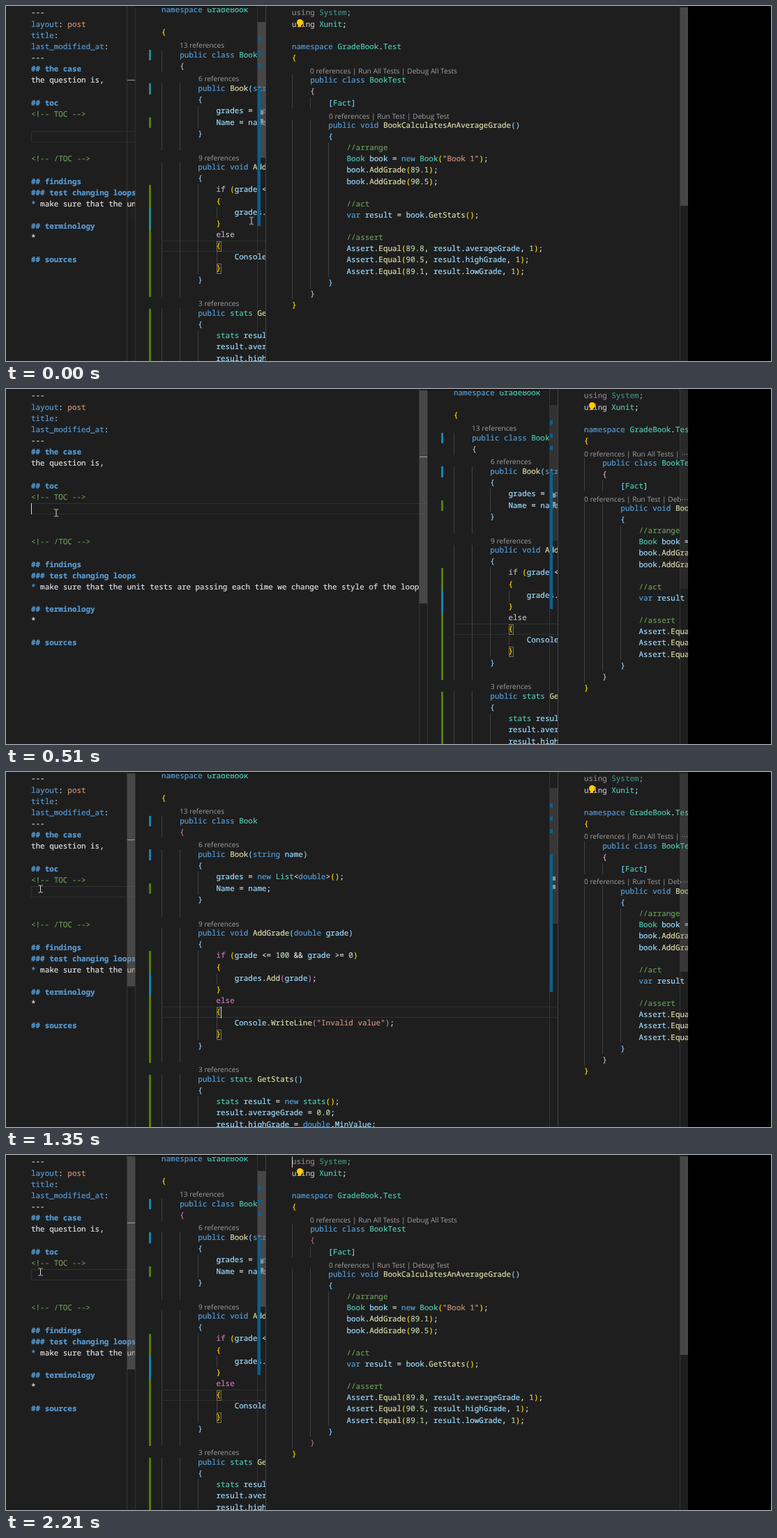
Animation, 1097 px wide and 510 px high, one loop 2.55 s. Source, as an HTML page:

```html
<!DOCTYPE html>
<html lang="en">
<head>
<meta charset="utf-8">
<title>Editor panes</title>
<style>
  html, body { margin: 0; width: 100%; height: 100%; overflow: hidden; background: #000; }
  #stage { position: relative; width: 1097px; height: 510px; overflow: hidden; background: #000; }
  #stage div, #stage svg { position: absolute; }

  .pane { top: 0; height: 510px; overflow: hidden; background: #1e1e1e; }
  #book { box-shadow: inset 1px 0 #303030; }
  #test { box-shadow: inset 1px 0 #444; }
  .line {
    white-space: pre; color: #e0e0e0; line-height: 16px;
    font-family: "Noto Sans Mono", "DejaVu Sans Mono", monospace; font-size: 10.91px;
    font-variant-ligatures: none; text-rendering: geometricPrecision;
    -webkit-text-stroke: .2px;
  }
  .lens {
    white-space: pre; color: #a0a0a0; line-height: 16px;
    font-family: "Open Sans", "Noto Sans", sans-serif; font-size: 10.15px;
    text-rendering: geometricPrecision;
  }
  .kw { color: #569cd6; } .type { color: #4ec9b0; } .var { color: #9cdcfe; }
  .fn { color: #dcdcaa; } .str { color: #ce9178; } .num { color: #b5cea8; }
  .note { color: #6a9955; } .ctrl { color: #c4b4c0; } .dim { opacity: .66; }
  .head { color: #569cd6; font-weight: bold; }
  .b0 { color: #ffd700; } .b1 { color: #c9b4c4; } .b2 { color: #8accf6; }

  .guide { width: 1px; background: #404040; }
  .row { right: -2px; height: 14px; border: 1px solid #303030; }
  .match { width: 5px; height: 13px; border: 1px solid #7c7440; }
  .diff { left: 20px; width: 3px; background: #587c0c; }
  .diff.mod { background: #1684b0; }
  .track { right: 0; top: 0; width: 11px; height: 510px; border-left: 1px solid #343434; }
  .thumb { left: 0; width: 11px; background: rgba(121, 121, 121, .45); }
  .mark { background: #0c5f8f; }
  .caret { width: 1px; height: 16px; background: #d8d8d8; }
  .shade { left: 0; right: 11px; top: 0; height: 3px; background: linear-gradient(#101010, #1e1e1e); }

  /* every change is a hard cut unless a keyframe says otherwise */
  #notes, #book, #test, #mouse, .thumb, .mod, .caret, .row, .ping, .wide, .slim, .hop, #book .b1, #test .b1, #book .ctrl {
    animation: 2550ms step-end infinite;
  }
  #notes { animation-name: notes; }
  #book { animation-name: book; }
  #test { animation-name: test; }
  #mouse { animation-name: mouse; }
  #notes .thumb { animation-name: notesThumb; }
  #book .thumb { animation-name: bookThumb; }
  #test .thumb { animation-name: testThumb; }
  #notes .row { animation-name: notesRow; }
  #notes .caret { animation-name: notesCaret; }
  #book .caret { animation-name: bookCaret; }
  #test .caret { animation-name: testCaret; }
  .mod { animation-name: mod; }
  .ping { animation-name: ping; }
  .wide { animation-name: wide; }
  .slim { animation-name: slim; }
  .hop { animation-name: hop; }
  #book .b1, #book .ctrl { animation-name: bookPink; }
  #test .b1 { animation-name: testPink; }

  @keyframes notes { 0%, 52.93% { width: 185px; } 19.99% { width: 604px; } }
  @keyframes book {
    0% { left: 185px; width: 187px; }
    19.99% { left: 604px; width: 187px; }
    52.93% { left: 185px; width: 606px; }
    77.64% { left: 185px; width: 187px; }
  }
  @keyframes test {
    0%, 77.64% { left: 372px; width: 606px; }
    19.99% { left: 791px; width: 187px; }
  }
  @keyframes mouse {
    0% { transform: translate(351.5px, 308.5px); animation-timing-function: steps(6); }
    16.46% { transform: translate(71.5px, 179px); }
    19.99% { transform: translate(71.5px, 178px); }
    28.62% { transform: translate(66px, 166px); }
    31.36% { transform: translate(61px, 157px); }
    34.5% { transform: translate(58.5px, 153px); }
    38.03% { transform: translate(55px, 157px); }
    43.91% { transform: translate(52px, 162px); }
    47.05% { transform: translate(50px, 166px); }
    49.8%, 100% { transform: translate(49px, 168px); }
  }
  @keyframes notesThumb { 0% { opacity: .04; } 10.97% { opacity: .5; } 13.72%, 100% { opacity: 1; } }
  @keyframes bookThumb {
    0%, 56.07% { opacity: 1; }
    19.99% { opacity: .5; } 22.34% { opacity: .08; } 52.93% { opacity: .6; }
  }
  @keyframes testThumb {
    0%, 22.34%, 80.78%, 100% { opacity: 1; }
    2.74% { opacity: .8; } 5.48% { opacity: .55; } 8.23% { opacity: .35; }
    10.97% { opacity: .2; } 13.72% { opacity: .1; } 19.99% { opacity: .25; }
    52.93% { opacity: .6; } 56.07% { opacity: .1; } 77.64% { opacity: .5; }
  }
  @keyframes notesRow { 0% { top: 180px; } 19.99%, 100% { top: 164px; } }
  @keyframes notesCaret { 0%, 38.03%, 100% { opacity: 0; } 19.99% { opacity: 1; } }
  @keyframes bookCaret { 0%, 71.75%, 100% { opacity: 0; } 52.93% { opacity: 1; } }
  @keyframes testCaret { 0% { opacity: 0; } 77.64%, 100% { opacity: 1; } }
  @keyframes mod { 0% { background: #268a8c; } 19.99%, 100% { background: #1684b0; } }
  @keyframes ping { 0% { top: 106px; } 19.99%, 100% { top: 97px; } }
  @keyframes wide { 0%, 77.64% { visibility: visible; } 19.99% { visibility: hidden; } }
  @keyframes slim {
    0%, 77.64% { visibility: hidden; transform: none; }
    19.99% { visibility: visible; transform: none; }
    28.62% { visibility: visible; transform: translateY(-1px); }
  }
  @keyframes hop { 0%, 86.66% { transform: none; } 61.95% { transform: translateY(1px); } }
  @keyframes bookPink { 0% { color: #c4b4c0; } 52.93%, 100% { color: #c878b8; } }
  @keyframes testPink { 0% { color: #c9b4c4; } 77.64%, 100% { color: #b5658f; } }
</style>
</head>
<body>
<div id="stage">
  <div id="notes" class="pane"></div>
  <div id="book" class="pane"></div>
  <div id="test" class="pane"></div>
  <svg id="mouse" width="9" height="14" viewBox="-4.5 -7 9 14" style="left:-4.5px;top:-7px" fill="none" stroke="#d8d8d8">
    <path d="M-3 -5h2l1 .7 1 -.7h2M0 -4.5v9M-3 5h2l1 -.7 1 .7h2"/>
  </svg>
</div>
<script>
const PITCH = 16.14, INDENT = 26.18, GUTTER = 38;

const notes = `---
layout: post
title:
last_modified_at:
---
## the case
the question is,

## toc
<!-- TOC -->



<!-- /TOC -->

## findings
### test changing loops
* make sure that the unit tests are passing each time we change the style of the loop

## terminology
*

## sources`;

const book = `namespace GradeBook

{

    public class Book
    {

        public Book(string name)
        {
            grades = new List<double>();
            Name = name;
        }


        public void AddGrade(double grade)
        {
            if (grade <= 100 && grade >= 0)
            {
                grades.Add(grade);
            }
            else
            {
                Console.WriteLine("Invalid value");
            }
        }


        public stats GetStats()
        {
            stats result = new stats();
            result.averageGrade = 0.0;
            result.highGrade = double.MinValue;`;

const test = `using System;
using Xunit;

namespace GradeBook.Test
{

    public class BookTest
    {
        [Fact]

        public void BookCalculatesAnAverageGrade()
        {
            //arrange
            Book book = new Book("Book 1");
            book.AddGrade(89.1);
            book.AddGrade(90.5);

            //act
            var result = book.GetStats();

            //assert
            Assert.Equal(89.8, result.averageGrade, 1);
            Assert.Equal(90.5, result.highGrade, 1);
            Assert.Equal(89.1, result.lowGrade, 1);
        }
    }
}`;

const KEYWORDS = /^(namespace|public|class|void|new|string|double|var)$/;
const CONTROL = /^(using|if|else)$/;
const TYPES = /^(GradeBook|Test|Book|BookTest|System|Xunit|Fact|stats|List)$/;

function add(parent, cls, style = {}, text = '') {
  const el = document.createElement('div');
  el.className = cls;
  for (const key in style) {
    const v = style[key];
    el.style[key] = typeof v === 'number' ? v + 'px' : v;
  }
  el.textContent = text;
  parent.append(el);
  return el;
}

function token(line, cls, text) {
  const span = document.createElement('span');
  span.className = cls;
  span.textContent = text;
  line.append(span);
}

function markdown(line, text) {
  const pair = text.match(/^(\w+)(:)(.*)$/);
  if (text[0] === '#') token(line, 'head', text);
  else if (text[0] === '<') token(line, 'note', text);
  else if (pair) {
    token(line, 'kw', pair[1]);
    token(line, '', pair[2]);
    token(line, 'str', pair[3]);
  } else if (text.startsWith('* ')) {
    token(line, 'kw', '*');
    token(line, '', text.slice(1));
  } else token(line, '', text);
}

// Colours C# by word class, and brackets by nesting depth.
function csharp() {
  let depth = 0;
  return (line, text) => {
    let prev = '';
    for (const m of text.matchAll(/\/\/.*|"[^"]*"|\d[\d.]*|\w+|\s+|./g)) {
      const s = m[0], next = text[m.index + s.length];
      let cls = '';
      if (s.startsWith('//')) cls = 'note';
      else if (s[0] === '"') cls = 'str';
      else if (/^\d/.test(s)) cls = 'num';
      else if (/[{([]/.test(s)) cls = 'b' + depth++ % 3;
      else if (/[})\]]/.test(s)) cls = 'b' + --depth % 3;
      else if (KEYWORDS.test(s)) cls = 'kw';
      else if (CONTROL.test(s)) cls = 'ctrl';
      else if (next === '(' && prev !== 'new') cls = 'fn';
      else if (TYPES.test(s)) cls = 'type';
      else if (/\w/.test(s)) cls = 'var';
      token(line, cls, s);
      if (s.trim()) prev = s;
    }
  };
}

function write(pane, source, left, first, paint) {
  source.split('\n').forEach((text, i) => {
    if (text) paint(add(pane, 'line', { left, top: first + i * PITCH - 8 }), text);
  });
}

// Each guide is [indent level, first row, last row].
function guides(pane, first, list) {
  for (const [level, from, to] of list) {
    add(pane, 'guide', {
      left: GUTTER + level * INDENT,
      top: first + from * PITCH - 8,
      height: (to - from + 1) * PITCH
    });
  }
}

function track(pane, top, bottom) {
  const bar = add(pane, 'track');
  add(bar, 'thumb', { top, height: bottom - top });
  return bar;
}

const [notesPane, bookPane, testPane] = ['notes', 'book', 'test'].map(id => document.getElementById(id));

add(notesPane, 'row', { left: 36 });
write(notesPane, notes, 36, 10.4, markdown);
add(notesPane, 'caret', { left: 36, top: 164 });
const notesBar = track(notesPane, 2, 308);
add(notesBar, 'ping', { left: 0, width: 11, height: 1, background: '#a0a0a0' });

add(bookPane, 'row', { left: GUTTER, top: 337 });
guides(bookPane, 6, [
  [0, 4, 5], [0, 7, 12], [0, 14, 25], [0, 27, 32],
  [1, 7, 12], [1, 14, 25], [1, 27, 32],
  [2, 9, 10], [2, 16, 23], [2, 29, 32], [3, 18, 18], [3, 22, 22]
]);
for (const [top, bottom, mod] of [
  [63, 78, 1], [111, 127, 1], [160, 175], [257, 289], [289, 322, 1], [322, 418], [435, 510]
]) add(bookPane, mod ? 'diff mod' : 'diff', { top, height: bottom - top });
for (const top of [338, 370]) add(bookPane, 'match', { left: 117, top });
write(bookPane, book, GUTTER, 6.2, csharp());
for (const [count, left, y, cls] of [
  [13, 64, 55.5, ''], [6, 91, 103.5, 'hop'], [9, 91, 217.5, ''], [3, 91, 426.5, 'hop']
]) add(bookPane, 'lens ' + cls, { left, top: y - 8 }, count + ' references');
add(bookPane, 'caret', { left: 123, top: 337, height: 17 });
add(bookPane, 'shade');
const bookBar = track(bookPane, 23, 218);
for (const top of [45, 64, 82]) add(bookBar, 'mark', { left: 0, top, width: 4, height: 6 });
add(bookBar, 'mark', { left: 0, top: 118, width: 4, height: 198 });
for (const top of [150, 162]) add(bookBar, 'mark', { left: 4, top, width: 4, height: 6, background: '#909090' });

guides(testPane, 10, [[0, 6, 8], [0, 10, 25], [1, 8, 8], [1, 10, 24], [2, 12, 23]]);
write(testPane, test, GUTTER, 10.4, csharp());
testPane.querySelector('.line').classList.add('dim');
for (const [y, left, full, cut] of [
  [92.5, 64, 'Run All Tests | Debug All Tests', 'Run All Tests | ⋯'],
  [157.5, 91, 'Run Test | Debug Test', 'Run Test | Deb⋯']
]) {
  add(testPane, 'lens wide', { left, top: y - 8 }, '0 references | ' + full);
  add(testPane, 'lens slim', { left: GUTTER, top: y - 8 }, '0 references | ' + cut);
}
add(testPane, '', { left: 44.5, top: 19, width: 9, height: 9, borderRadius: '50%', background: '#ffcc00' });
add(testPane, '', { left: 47, top: 27, width: 4, height: 3, background: '#ffcc00' });
add(testPane, 'caret', { left: 38, top: 2 });
track(testPane, 2, 287);
</script>
</body>
</html>
```
